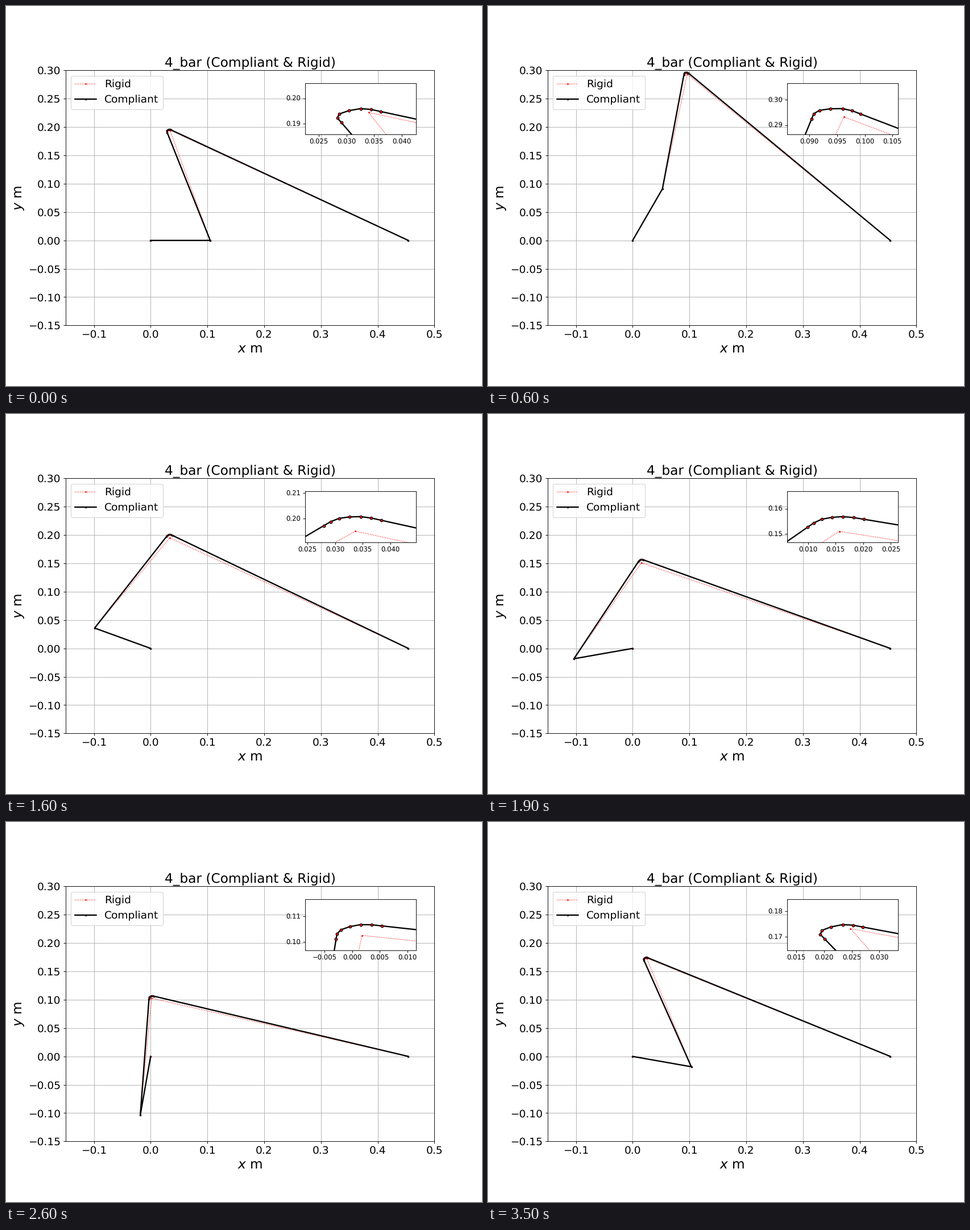
Write a matplotlib script that moves like this. It is 837 px wide and 669 px high and loops after 3.6 s.

```python
import numpy as np
import matplotlib.pyplot as plt
from matplotlib.animation import FuncAnimation

W, H, DPI = 837, 669, 83.7
FRAMES, INTERVAL = 36, 100

# Linkage dimensions in metres
CRANK, GROUND = 0.105, 0.454
COUPLER, ROCKER = 0.2051, 0.461    # stiff parts of the compliant links
RIGID_COUPLER, RIGID_ROCKER = 0.207, 0.4632
RIGID_SLACK = 0.0006

# Flexible hinge: six short segments that share the bend between the links
SEGMENT = 0.002
SHARE = np.array([1, 0.85, 0.54, 0.37, 0.12, 0])
STRETCH = np.array([-0.03, -0.21, 0.08, 0.14, -0.06, -0.02])
U = np.linspace(0, 1, 6)
SLIGHT, STRONG = np.radians([80, 137])

plt.rcParams["text.hinting"] = "none"


def polar(length, angle):
    return length * np.exp(1j * angle)


def rigid_nodes(theta):
    a = polar(CRANK, theta)
    d = GROUND - a
    r = abs(d)
    rocker = RIGID_ROCKER - RIGID_SLACK * np.cos(theta - np.radians(50))
    cos = (RIGID_COUPLER**2 + r**2 - rocker**2) / (2 * RIGID_COUPLER * r)
    p = a + polar(RIGID_COUPLER, np.angle(d) + np.arccos(cos))
    return np.array([0, a, p, GROUND])


def hinge_segments(phi, psi):
    k = (phi - psi - SLIGHT) / (STRONG - SLIGHT)
    share = SHARE - k * U * (1 - U)**3
    return polar(SEGMENT * (1 + k * STRETCH), psi + share * (phi - psi))


def compliant_nodes(theta):
    """Close the loop for the coupler angle phi and rocker angle psi."""
    _, a, p, _ = rigid_nodes(theta)
    phi, psi = np.angle(p - a), np.angle(GROUND - p)

    def gap(phi, psi):
        z = (a + polar(COUPLER, phi) + hinge_segments(phi, psi).sum()
             + polar(ROCKER, psi) - GROUND)
        return np.array([z.real, z.imag])

    h = 1e-6
    for _ in range(10):
        g = gap(phi, psi)
        jac = np.column_stack([gap(phi + h, psi) - g, gap(phi, psi + h) - g]) / h
        phi, psi = np.array([phi, psi]) - np.linalg.solve(jac, g)
    start = a + polar(COUPLER, phi)
    tip = start + np.cumsum(hinge_segments(phi, psi))
    return np.concatenate([[0, a, start], tip, [GROUND]])


def add_lines(axes, size):
    red, = axes.plot([], [], "r:o", lw=1, ms=1.5, mew=0.9, label="Rigid")
    black, = axes.plot([], [], "k-o", lw=2, ms=size, mfc="r", label="Compliant")
    return red, black


fig, ax = plt.subplots(figsize=((W + 1e-6) / DPI, (H + 1e-6) / DPI), dpi=DPI)
ax.set(xlim=(-0.15, 0.5), ylim=(-0.15, 0.3), aspect="equal")
ax.set_title("4_bar (Compliant & Rigid)", fontsize=20)
ax.set_xlabel("$x$ m", fontsize=20)
ax.set_ylabel("$y$ m", fontsize=20)
ax.tick_params(labelsize=16)
ax.grid()
zoom = ax.inset_axes([0.65, 0.75, 0.3, 0.2])

main_lines = add_lines(ax, 2)
zoom_lines = add_lines(zoom, 4)
legend = ax.legend(loc="upper left", fontsize=16)

# Keep level links at their true width
for line in (*main_lines, *zoom_lines, *legend.get_lines()):
    line.set_snap(False)


def update(i):
    theta = 2 * np.pi * i / FRAMES
    shapes = rigid_nodes(theta), compliant_nodes(theta)
    for lines in (main_lines, zoom_lines):
        for line, z in zip(lines, shapes):
            line.set_data(z.real, z.imag)
    mid = shapes[1][6]
    zoom.set_xlim(mid.real - 0.01, mid.real + 0.01)
    zoom.set_ylim(mid.imag - 0.01, mid.imag + 0.01)
    return main_lines + zoom_lines


anim = FuncAnimation(fig, update, frames=FRAMES, interval=INTERVAL,
                     repeat=True, repeat_delay=0)
plt.show()
```
